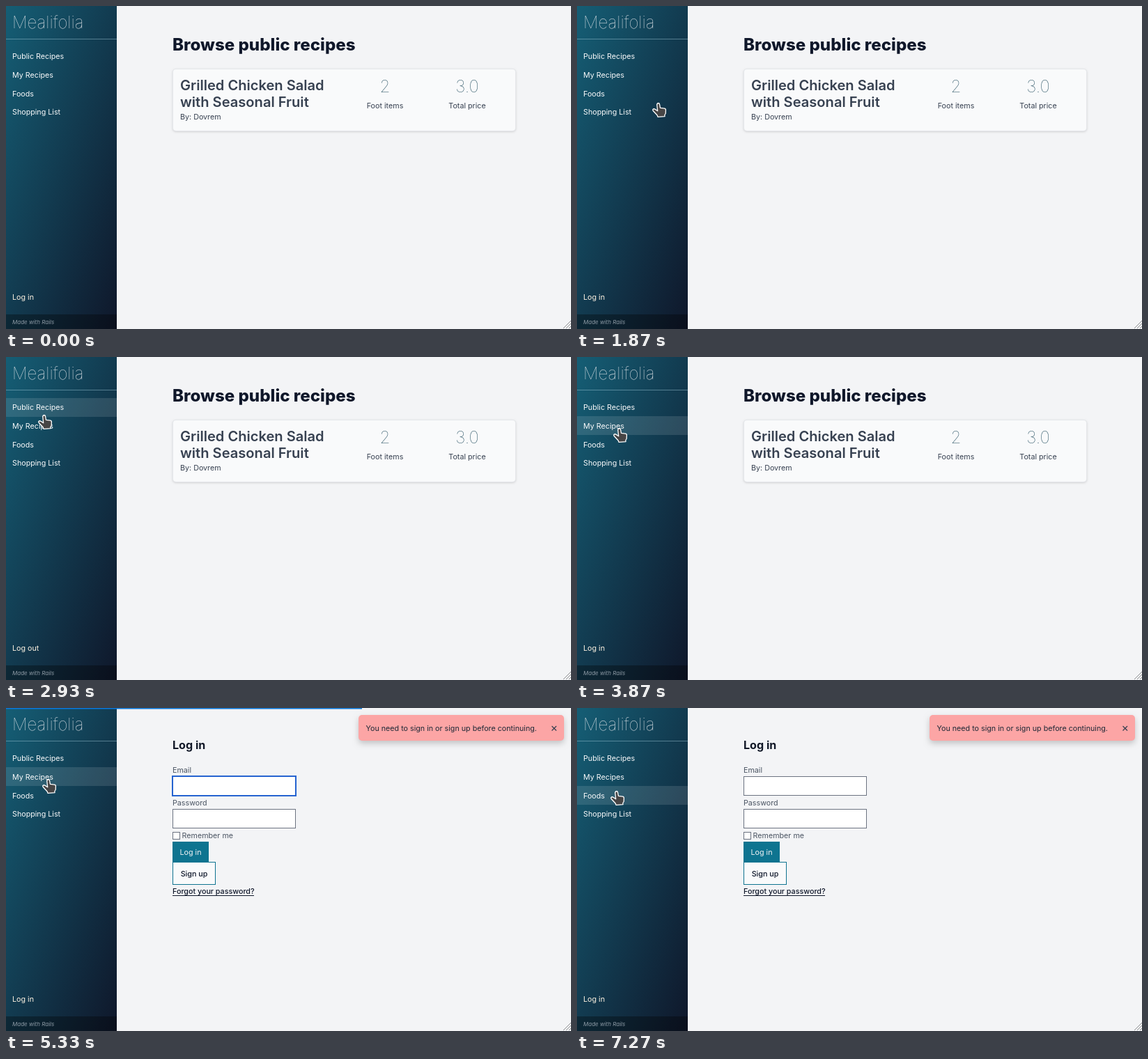
Animation of 811x464 px, one loop 8000 ms. Source, as an HTML page with a canvas:

```html
<!DOCTYPE html>
<html lang="en">
<head>
<meta charset="utf-8">
<title>Recipes</title>
<style>
html, body { margin: 0; width: 100%; height: 100%; overflow: hidden; background: #f3f4f6; }
canvas { display: block; width: 811px; height: 464px; }
</style>
</head>
<body>
<canvas id="stage" width="811" height="464"></canvas>
<script>
const ctx = document.getElementById('stage').getContext('2d', { alpha: false });
const LOOP = 8000, FPS = 15;
const ZOOM = 0.67;            // the page is shown at 67 % browser zoom
const ROW = 40 * ZOOM;
const SIDE = 159, HEIGHT = 464;
const NAV = ['Public Recipes', 'My Recipes', 'Foods', 'Shopping List'];

// All times are in ticks of 1/15 s.
const CURSOR_START = { at: 16, x: 271, y: 333 };
const MOVES = [
  { from: 17, to: 18, x: 247, y: 319 },
  { from: 23, to: 30, x: 93, y: 105 },
  { from: 33, to: 36, x: 55, y: 82 },
  { from: 46, to: 47, x: 54, y: 88 },
  { from: 48, to: 58, x: 61, y: 101 },
  { from: 97, to: 102, x: 57, y: 118 }
];
const HOVERS = [{ at: 30, row: 1 }, { at: 44, row: 0 }, { at: 51, row: 1 }, { at: 100, row: 2 }];
const SIGNED_IN = 44, SIGNED_OUT = 51, LOGIN_PAGE = 80, BLUR = 109;
const LOADS = [{ at: 49, width: 652 }, { at: 78, width: 511 }];

const easeOut = p => 1 - (1 - p) ** 1.5;

function text(str, x, y, { size = 16, weight = 400, color = '#374151', align = 'left', style = '' } = {}) {
  ctx.font = `${style} ${weight} ${size * ZOOM}px Inter, sans-serif`;
  ctx.fillStyle = color;
  ctx.textAlign = align;
  ctx.fillText(str, x, y);
}

function rect(x, y, w, h, fill) {
  ctx.fillStyle = fill;
  ctx.fillRect(x, y, w, h);
}

function box(x, y, w, h, border, fill, line = 1) {
  rect(x, y, w, h, border);
  rect(x + line, y + line, w - 2 * line, h - 2 * line, fill);
}

function panel(x, y, w, h, radius, fill, shadow = 'transparent', blur = 0, drop = 0) {
  ctx.save();
  ctx.shadowColor = shadow;
  ctx.shadowBlur = blur;
  ctx.shadowOffsetY = drop;
  ctx.fillStyle = fill;
  ctx.beginPath();
  ctx.roundRect(x, y, w, h, radius);
  ctx.fill();
  ctx.restore();
}

function line(x1, y1, x2, y2, color, width) {
  ctx.strokeStyle = color;
  ctx.lineWidth = width;
  ctx.beginPath();
  ctx.moveTo(x1, y1);
  ctx.lineTo(x2, y2);
  ctx.stroke();
}

// CSS "to bottom right": the middle colour runs through the other two corners.
function cornerGradient(w, h, from, to) {
  const k = w * h / (w * w + h * h);
  const g = ctx.createLinearGradient(w / 2 - h * k, h / 2 - w * k, w / 2 + h * k, h / 2 + w * k);
  g.addColorStop(0, from);
  g.addColorStop(1, to);
  return g;
}

function sidebar(tick) {
  rect(0, 0, SIDE, HEIGHT, cornerGradient(SIDE, HEIGHT, '#155e75', '#0f172a'));
  text('Mealifolia', 9, 32, { size: 36, weight: 100, color: '#e5e7eb' });
  rect(0, 47, SIDE, 1, 'rgba(165,205,220,.45)');

  const hover = HOVERS.findLast(h => h.at <= tick);
  if (hover) {
    const top = Math.round(58.6 + hover.row * ROW);
    rect(0, top, SIDE, Math.round(ROW), 'rgba(255,255,255,.115)');
  }
  NAV.forEach((label, i) => text(label, 9, Math.round(76 + i * ROW), { color: '#f9fafb' }));

  const signedIn = tick >= SIGNED_IN && tick < SIGNED_OUT;
  text(signedIn ? 'Log out' : 'Log in', 9, 422, { color: '#fef3e2' });
  rect(0, 443, SIDE, 21, 'rgba(0,0,0,.33)');
  text('Made with Rails', 9, 457, { size: 12, style: 'italic', color: '#8d9aa5' });
}

function stat(value, label, x) {
  text(value, x, 124, { size: 36, weight: 100, color: '#1f4a5c', align: 'center' });
  text(label, x, 147, { align: 'center' });
}

function recipesPage() {
  text('Browse public recipes', 239, 64, { size: 36, weight: 800, color: '#0f172a' });
  panel(239, 90, 493, 90, 5, '#e5e7eb', 'rgba(0,0,0,.14)', 3, 1);
  panel(240, 91, 491, 88, 4, '#f9fafb');
  const title = { size: 30, weight: 600 };
  text('Grilled Chicken Salad', 250, 121, title);
  text('with Seasonal Fruit', 250, 145, title);
  text('By: Dovrem', 250, 163);
  stat('2', 'Foot items', 544);
  stat('3.0', 'Total price', 662);
}

function loginPage(focused) {
  const label = { color: '#4b5563' };
  const strong = { weight: 500, color: '#0f172a' };
  const input = (x, y, w, h) => box(x, y, w, h, '#6b7280', '#fff');

  text('Log in', 239, 59, { size: 24, weight: 700, color: '#111827' });
  text('Email', 239, 93, label);
  if (focused) box(238, 97, 179, 30, '#2563d0', '#fff', 2);
  else input(239, 98, 177, 28);
  text('Password', 239, 140, label);
  input(239, 145, 177, 28);
  input(239, 178, 11, 11);
  text('Remember me', 252.5, 187, label);

  rect(239, 192, 52, 30, '#0e7490');
  text('Log in', 249.5, 211, { color: '#f3f4f6' });
  box(239, 221, 62, 33, '#0e7490', '#f9fafb');
  text('Sign up', 250.7, 242, strong);
  text('Forgot your password?', 239, 267, strong);
  rect(239, 269, 117, 1, '#0f172a');

  panel(506, 10, 295, 37, 5, '#fca5a5', 'rgba(0,0,0,.2)', 9, 4);
  text('You need to sign in or sign up before continuing.', 516.5, 33, { color: '#1f2937' });
  line(783.5, 26, 790, 32.5, '#374151', 1.2);
  line(790, 26, 783.5, 32.5, '#374151', 1.2);
}

// The bar waits at a tenth of the stage until the response lets it run on, then vanishes.
function progressBar(tick) {
  for (const { at, width } of LOADS) {
    const age = tick - at;
    if (age >= 0 && age < 5) rect(0, 0, age < 2 ? 81 : width, 1.5, '#0a78dc');
  }
}

function cursorAt(tick) {
  let { x, y } = CURSOR_START;
  for (const move of MOVES) {
    const p = Math.min(1, Math.max(0, (tick - move.from) / (move.to - move.from)));
    x += (move.x - x) * easeOut(p);
    y += (move.y - y) * easeOut(p);
  }
  return [Math.round(x), Math.round(y)];
}

const ARROW = new Path2D('M.7 .7V16.5L4.5 13L7 19L9.8 17.8L7.3 12H12.5Z');
const HAND = new Path2D('M-2.3 3.5Q-1.8 1.5 0 1.5Q1.4 1.7 1.6 3.5L2.5 8.3L8.5 9.1Q10.5 9.4 10.4 11.3' +
  'L10.2 16.5L8.8 18.5L9 20.6L-1 21.4L-1.8 19L-7.8 12.5Q-8.8 10.8 -7.3 9.9Q-6 9.4 -4.8 10.4L-1.3 12.8Z');

function cursor(tick) {
  if (tick < CURSOR_START.at) return;
  const [x, y] = cursorAt(tick);
  const shape = x < SIDE ? HAND : ARROW;
  ctx.save();
  ctx.translate(x, y);
  ctx.lineJoin = 'round';
  ctx.fillStyle = '#474545';
  ctx.fill(shape);
  ctx.strokeStyle = '#fff';
  ctx.lineWidth = 1.3;
  ctx.stroke(shape);
  ctx.restore();
}

function draw(tick) {
  rect(0, 0, 811, HEIGHT, '#f3f4f6');
  if (tick < LOGIN_PAGE) recipesPage();
  else loginPage(tick < BLUR);
  sidebar(tick);
  for (let x = 800; x < 811; x += 4) line(x, 463, 811, x - 348, '#8b8d90', 1);
  progressBar(tick);
  cursor(tick);
}

const start = performance.now();
function loop() {
  const ms = (performance.now() - start) % LOOP;
  draw(Math.floor((ms + 4) * FPS / 1000) % (LOOP * FPS / 1000));
  requestAnimationFrame(loop);
}
loop();
</script>
</body>
</html>
```
